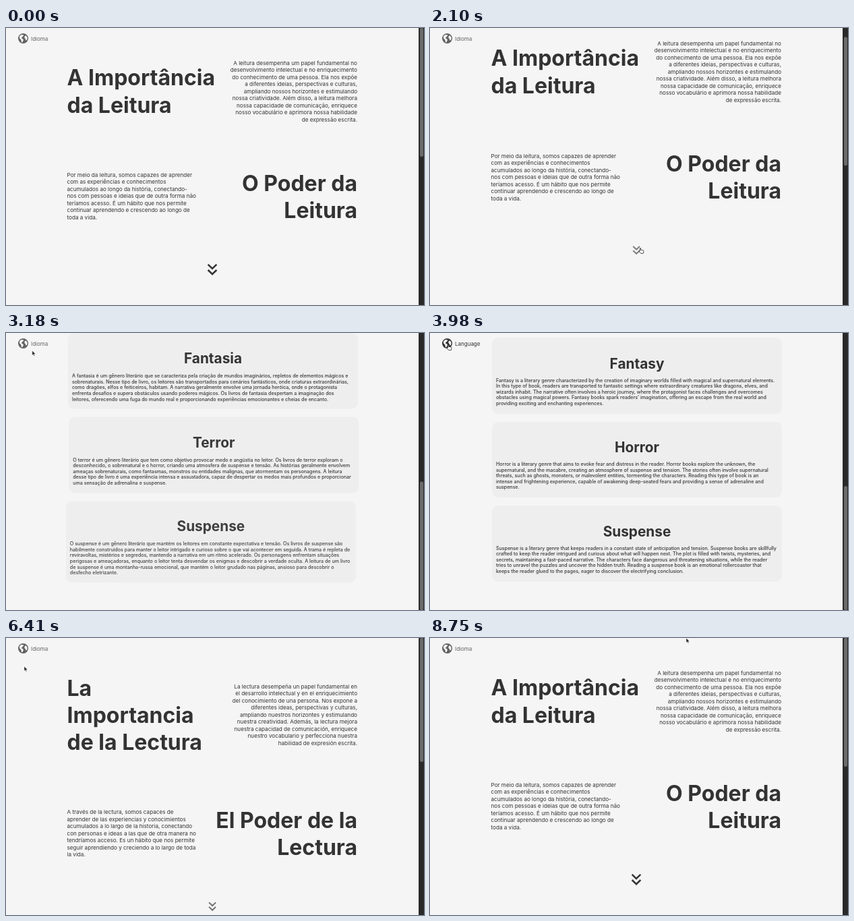
Animation of 620 by 411 pixels, one loop 8.81 s. Source, as an HTML page:

```html
<!DOCTYPE html>
<html lang="pt">
<head>
<meta charset="utf-8">
<style>
html, body { margin: 0; width: 100%; height: 100%; overflow: hidden; background: #f5f5f5; }
body { position: relative; font: 8.13px/10.5px Inter, sans-serif; color: #333; }
div, svg { position: absolute; }
.text { white-space: pre; transform: translateY(-50%); }
.left { left: 90.5px; }
.right { right: 99px; text-align: right; }
.big { font-weight: 700; font-size: 32px; line-height: 40.3px; }
.page { left: 0; top: 0; width: 620px; height: 0; }
.card { left: 92px; width: 430px; background: #eee; border-radius: 9px; }
.card .title { left: 0; width: 100%; top: 38.5px; text-align: center; font-weight: 700; font-size: 20.8px; }
.card .body { left: 6px; top: 59.5px; white-space: pre; font-size: 7.15px; line-height: 8.6px; -webkit-text-stroke: .1px; }
#label { left: 37px; top: 15.5px; font-size: 8px; }
#track { left: 612px; top: 0; width: 8px; height: 411px; background: #292929; }
#thumb { left: 2px; top: 0; width: 5px; border-radius: 3px; background: #6b6b6b; }
svg { overflow: visible; left: 0; top: 0; }
</style>
</head>
<body>
<div id="pages"></div>
<svg id="arrow" width="1" height="1"><path d="M-6.4-7.2L0-1L6.4-7.2M-6.4 1L0 7.2L6.4 1" fill="none" stroke="#333" stroke-width="2.5"/></svg>
<div id="language">
  <svg style="left:18px;top:8px" width="15" height="15" viewBox="0 0 20 20">
    <circle cx="10" cy="10" r="10" fill="#333"/>
    <path d="M2.5 6L6 2.5L10.5 2.5L10.5 5L7.5 7.5L6.5 9.5L9.5 11L10.5 13.5L8 18L6.5 17L6 13L3 10ZM13 5L16 4.5L18.3 8.5L17.5 13L15.5 14L14.5 11L12.5 9Z" fill="#f5f5f5"/>
  </svg>
  <div id="label" class="text"></div>
</div>
<div id="track"><div id="thumb"></div></div>
<svg id="cursor" width="1" height="1"><path stroke-linejoin="round"/></svg>
<script>
const LOOP = 8810, VIEW = 411;
const $ = id => document.getElementById(id);

// rows: centre lines of the two sections and the arrow; cardTop: first card
const content = {
  pt: {
    label: 'Idioma', rows: [94.3, 250.5, 358], cardTop: 474.7, height: 885.5,
    title1: 'A Importância\nda Leitura',
    text1: `A leitura desempenha um papel fundamental no
desenvolvimento intelectual e no enriquecimento
do conhecimento de uma pessoa. Ela nos expõe
a diferentes ideias, perspectivas e culturas,
ampliando nossos horizontes e estimulando
nossa criatividade. Além disso, a leitura melhora
nossa capacidade de comunicação, enriquece
nosso vocabulário e aprimora nossa habilidade
de expressão escrita.`,
    text2: `Por meio da leitura, somos capazes de aprender
com as experiências e conhecimentos
acumulados ao longo da história, conectando-
nos com pessoas e ideias que de outra forma não
teríamos acesso. É um hábito que nos permite
continuar aprendendo e crescendo ao longo de
toda a vida.`,
    title2: 'O Poder da\nLeitura',
    cards: [['Fantasia', `A fantasia é um gênero literário que se caracteriza pela criação de mundos imaginários, repletos de elementos mágicos e
sobrenaturais. Nesse tipo de livro, os leitores são transportados para cenários fantásticos, onde criaturas extraordinárias,
como dragões, elfos e feiticeiros, habitam. A narrativa geralmente envolve uma jornada heróica, onde o protagonista
enfrenta desafios e supera obstáculos usando poderes mágicos. Os livros de fantasia despertam a imaginação dos
leitores, oferecendo uma fuga do mundo real e proporcionando experiências emocionantes e cheias de encanto.`],
    ['Terror', `O terror é um gênero literário que tem como objetivo provocar medo e angústia no leitor. Os livros de terror exploram o
desconhecido, o sobrenatural e o horror, criando uma atmosfera de suspense e tensão. As histórias geralmente envolvem
ameaças sobrenaturais, como fantasmas, monstros ou entidades malignas, que atormentam os personagens. A leitura
desse tipo de livro é uma experiência intensa e assustadora, capaz de despertar os medos mais profundos e proporcionar
uma sensação de adrenalina e suspense.`],
    ['Suspense', `O suspense é um gênero literário que mantém os leitores em constante expectativa e tensão. Os livros de suspense são
habilmente construídos para manter o leitor intrigado e curioso sobre o que vai acontecer em seguida. A trama é repleta de
reviravoltas, mistérios e segredos, mantendo a narrativa em um ritmo acelerado. Os personagens enfrentam situações
perigosas e ameaçadoras, enquanto o leitor tenta desvendar os enigmas e descobrir a verdade oculta. A leitura de um livro
de suspense é uma montanha-russa emocional, que mantém o leitor grudado nas páginas, ansioso para descobrir o
desfecho eletrizante.`]]
  },
  en: {
    label: 'Language', rows: [114.6, 291, 398], cardTop: 514, height: 918,
    title1: 'The\nImportance of\nReading',
    text1: `Reading plays a fundamental role in intellectual
development and enriching one's knowledge. It
exposes us to different ideas, perspectives, and
cultures, expanding our horizons and stimulating
our creativity. Furthermore, reading improves our
communication skills, enriches our vocabulary,
and enhances our writing ability.`,
    text2: `Through reading, we are able to learn from the
experiences and accumulated knowledge
throughout history, connecting with people and
ideas that we wouldn't otherwise have access to.
It is a habit that allows us to continue learning
and growing throughout our lives.`,
    title2: 'The Power of\nReading',
    cards: [['Fantasy', `Fantasy is a literary genre characterized by the creation of imaginary worlds filled with magical and supernatural elements.
In this type of book, readers are transported to fantastic settings where extraordinary creatures like dragons, elves, and
wizards inhabit. The narrative often involves a heroic journey, where the protagonist faces challenges and overcomes
obstacles using magical powers. Fantasy books spark readers' imagination, offering an escape from the real world and
providing exciting and enchanting experiences.`],
    ['Horror', `Horror is a literary genre that aims to evoke fear and distress in the reader. Horror books explore the unknown, the
supernatural, and the macabre, creating an atmosphere of suspense and tension. The stories often involve supernatural
threats, such as ghosts, monsters, or malevolent entities, tormenting the characters. Reading this type of book is an
intense and frightening experience, capable of awakening deep-seated fears and providing a sense of adrenaline and
suspense.`],
    ['Suspense', `Suspense is a literary genre that keeps readers in a constant state of anticipation and tension. Suspense books are skillfully
crafted to keep the reader intrigued and curious about what will happen next. The plot is filled with twists, mysteries, and
secrets, maintaining a fast-paced narrative. The characters face dangerous and threatening situations, while the reader
tries to unravel the puzzles and uncover the hidden truth. Reading a suspense book is an emotional rollercoaster that
keeps the reader glued to the pages, eager to discover the electrifying conclusion.`]]
  },
  es: {
    label: 'Idioma', rows: [114.6, 291, 398], cardTop: 514, height: 918,
    title1: 'La\nImportancia\nde la Lectura',
    text1: `La lectura desempeña un papel fundamental en
el desarrollo intelectual y en el enriquecimiento
del conocimiento de una persona. Nos expone a
diferentes ideas, perspectivas y culturas,
ampliando nuestros horizontes y estimulando
nuestra creatividad. Además, la lectura mejora
nuestra capacidad de comunicación, enriquece
nuestro vocabulario y perfecciona nuestra
habilidad de expresión escrita.`,
    text2: `A través de la lectura, somos capaces de
aprender de las experiencias y conocimientos
acumulados a lo largo de la historia, conectando
con personas e ideas a las que de otra manera no
tendríamos acceso. Es un hábito que nos permite
seguir aprendiendo y creciendo a lo largo de toda
la vida.`,
    title2: 'El Poder de la\nLectura',
    cards: []
  }
};

function add(parent, className, text = '', top) {
  const el = parent.appendChild(document.createElement('div'));
  el.className = className;
  el.textContent = text;
  if (top !== undefined) el.style.top = top + 'px';
  return el;
}

for (const lang of Object.values(content)) {
  const page = lang.page = add($('pages'), 'page');
  const [first, second] = lang.rows;
  add(page, 'text big left', lang.title1, first);
  add(page, 'text right', lang.text1, first - .8);
  add(page, 'text left', lang.text2, second - .6);
  add(page, 'text big right', lang.title2, second);
  let top = lang.cardTop;
  lang.cardEls = lang.cards.map(([title, body]) => {
    const card = add(page, 'card', '', top);
    const height = 69.5 + 8.6 * body.split('\n').length;
    card.style.height = height + 'px';
    add(card, 'text title', title);
    add(card, 'body', body);
    top += height + 12;
    return card;
  });
}

const shapes = {
  arrow: ['M0 0V7L1.6 5.6L2.7 8L3.8 7.5L2.8 5.2H5Z', '#222', '#fff', .5],
  hand: ['M1.4 5V.8Q2 0 2.7 .8V3.2L6.3 3.9Q7.2 4.2 7 5.4L6.3 8.4H2.6L.1 5.6Q.2 4.5 1.4 5Z', '#fff', '#222', .8],
  beam: ['M-1.5-4Q0-4 0-3Q0-4 1.5-4M0-3V3M-1.5 4Q0 4 0 3Q0 4 1.5 4', 'none', '#555', .8]
};
// time, x, y, pointer shape from then on
const path = [
  [0, 381, -14, 'arrow'], [70, 378, 57, 'arrow'], [850, 322, 338, 'arrow'], [1150, 310, 326, 'hand'],
  [2250, 310, 326, 'arrow'], [2760, 95, 66, 'beam'], [2900, 90, 60, 'arrow'], [3300, 25, 17, 'hand'],
  [4060, 25, 17, 'hand'], [4290, 33, 34, 'arrow'], [4550, 33, 34, 'arrow'], [5000, 93, 146, 'beam'],
  [5420, 93, 146, 'arrow'], [5760, 26, 17, 'hand'], [6220, 26, 17, 'hand'], [6410, 27, 42, 'arrow'],
  [6560, 28, 47, 'arrow'], [6760, 28, 47, 'arrow'], [7000, 26, 17, 'hand'], [7560, 26, 17, 'hand'],
  [8130, 342, 115, 'arrow'], [8750, 380, 0, 'arrow'], [8810, 381, -14, 'arrow']
];

const clamp = v => Math.min(1, Math.max(0, v));
const progress = (t, from, to) => clamp((t - from) / (to - from));
const smooth = u => u * u * (3 - 2 * u);
const inOut = (u, n) => u < .5 ? (2 * u) ** n / 2 : 1 - (2 - 2 * u) ** n / 2;
const bezier = (s, a, b) => 3 * s * (1 - s) ** 2 * a + 3 * s * s * (1 - s) * b + s ** 3;

// the CSS "ease" curve
function ease(u) {
  let lo = 0, hi = 1;
  for (let i = 0; i < 20; i++) {
    const s = (lo + hi) / 2;
    if (bezier(s, .25, .25) < u) lo = s; else hi = s;
  }
  return bezier(lo, .1, 1);
}

function draw(t) {
  const lang = content[t < 3980 || t >= 7430 ? 'pt' : t < 6000 ? 'en' : 'es'];
  const scrolled = inOut(progress(t, 1780, 2760), 5) - inOut(progress(t, 4520, 5060), 2);
  const scroll = scrolled * (lang.height - VIEW);

  for (const l of Object.values(content)) l.page.style.display = l === lang ? '' : 'none';
  lang.page.style.transform = `translateY(${-scroll}px)`;
  lang.cardEls.forEach((card, i) => {
    const begin = [2210, 2400, 2520][i];
    const shown = lang === content.pt ? ease(progress(t, begin, begin + 1000)) : 1;
    card.style.opacity = shown ** .85;
    card.style.transform = `translateX(${(i % 2 ? 40 : -40) * (1 - shown)}px)`;
  });

  const pulse = (1 - Math.cos(t / LOOP * 12 * Math.PI)) / 2;
  $('arrow').style.transform = `translate(306px,${lang.rows[2] - scroll}px) scale(${1 - .25 * pulse})`;
  $('arrow').style.opacity = 1 - .38 * pulse;

  $('thumb').style.height = VIEW * VIEW / lang.height + 'px';
  $('thumb').style.transform = `translateY(${scroll * VIEW / lang.height}px)`;

  const next = path.findIndex(key => key[0] > t);
  const [t0, x0, y0, kind] = path[next - 1], [t1, x1, y1] = path[next];
  const u = smooth(progress(t, t0, t1));
  const x = x0 + (x1 - x0) * u, y = y0 + (y1 - y0) * u;
  const [d, fill, stroke, width] = shapes[kind];
  const pointer = $('cursor').firstChild;
  Object.entries({ d, fill, stroke, 'stroke-width': width }).forEach(([k, v]) => pointer.setAttribute(k, v));
  $('cursor').style.transform = `translate(${x}px,${y}px)`;

  $('label').textContent = lang.label;
  $('language').style.opacity = x < 76 && y < 25 ? 1 : .75;
}

const start = performance.now();
function frame() {
  draw((performance.now() - start) % LOOP);
  requestAnimationFrame(frame);
}
frame();
</script>
</body>
</html>
```
